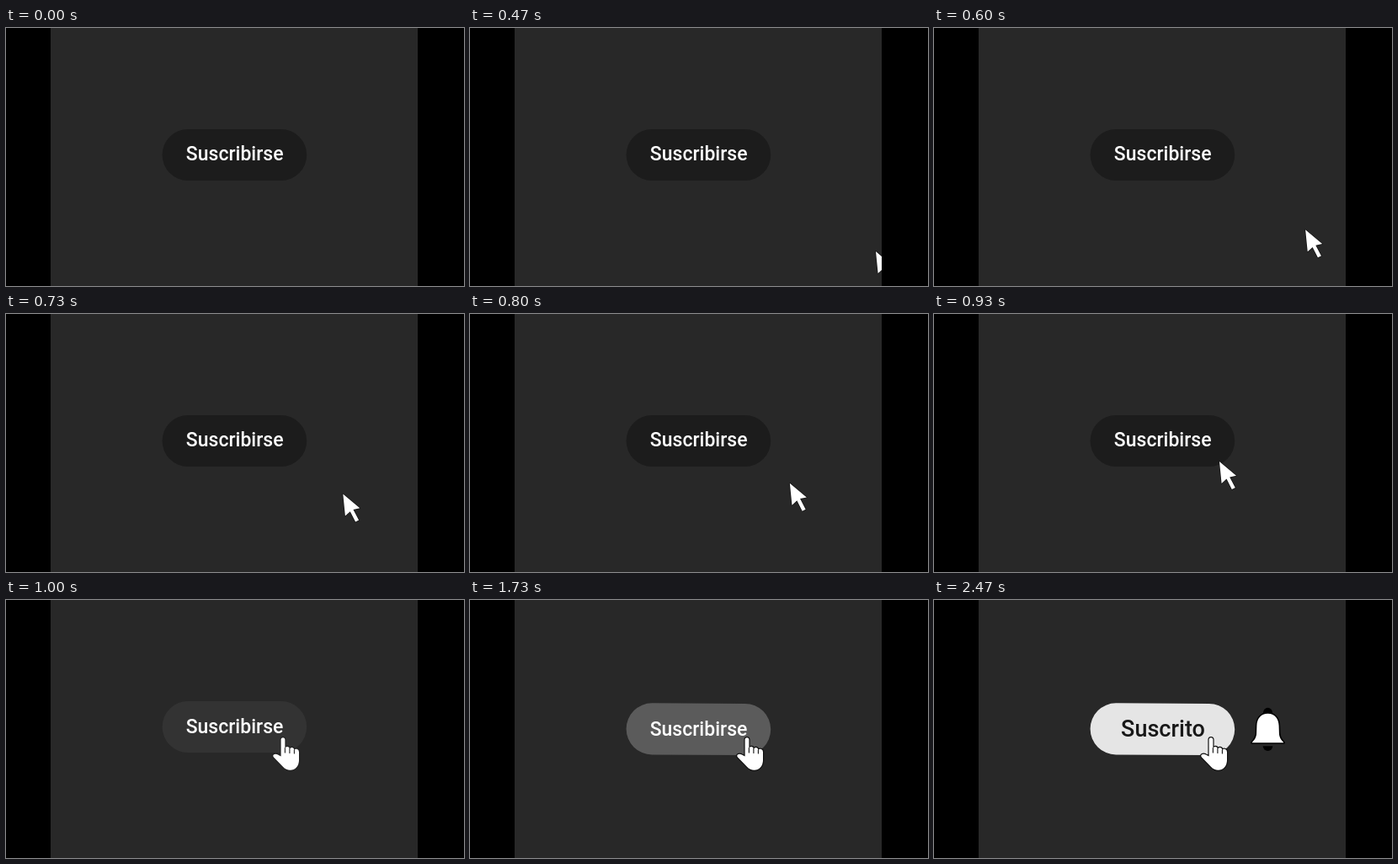
Animation, 544 px wide and 306 px high, one loop 4990 ms. Source, as an HTML page with a canvas:

```html
<!DOCTYPE html>
<html lang="es">
<head>
<meta charset="utf-8">
<title>Suscribirse</title>
<style>
  html, body { margin: 0; width: 100%; height: 100%; overflow: hidden; background: #000; }
  canvas { display: block; width: 544px; height: 306px; }
</style>
</head>
<body>
<canvas id="stage" width="544" height="306"></canvas>
<script>
const ctx = document.getElementById('stage').getContext('2d');
const LOOP = 4990;
const FRAME = 1000 / 15;
const ENTER = 470, HOVER = 1000, PRESS = 1730, DONE = 2470;

const arrow = new Path2D('M0 0 L20 16.8 L12.2 18.4 L18.8 31 L14.8 33 L8.5 20.6 L2.6 26 Z');

const hand = new Path2D(
  'M326.6 185.5 V165.8 Q326.6 163.2 329 163.2 Q331.4 163.2 331.4 165.8 V175.8 ' +
  'Q332.3 173.8 334.4 174 Q336.6 174.2 336.9 176.6 Q338 174.7 340 175 ' +
  'Q342.2 175.4 342.4 178 Q343.5 176.3 345.5 176.8 Q348 177.4 348 180.2 ' +
  'V190 Q348 195 345 198.5 Q342 201.8 337.5 201.8 Q332.8 201.8 329.2 198 ' +
  'L318 186.6 Q316.4 184.6 318.2 183.3 Q320 182.2 322.4 183.2 Z');
const knuckles = new Path2D('M331.4 175.5 V181 M336.9 176.4 V181.5 M342.4 177.8 V182');

const bell = new Path2D(
  'M396.5 134.8 C388.5 134.8 383.6 140.6 383.4 149 L383.1 158 ' +
  'C382.9 163.5 380.5 166 377.6 169.2 L415.4 169.2 ' +
  'C412.5 166 410.1 163.5 409.9 158 L409.6 149 C409.4 140.6 404.5 134.8 396.5 134.8 Z');

function shape(path, fill, stroke, width) {
  ctx.lineJoin = 'round';
  ctx.lineWidth = width;
  ctx.strokeStyle = stroke;
  ctx.stroke(path);
  ctx.fillStyle = fill;
  ctx.fill(path);
}

function pill(color, top, bottom, tilt) {
  const left = 185.6, right = 357.2, r = (bottom - top) / 2;
  const mid = top + r;
  ctx.beginPath();
  ctx.arc(left + r, mid, r, Math.PI / 2, Math.PI * 1.5);
  ctx.lineTo(right - r, top + tilt);
  ctx.arc(right - r, mid + tilt, r, -Math.PI / 2, Math.PI / 2);
  ctx.closePath();
  ctx.fillStyle = color;
  ctx.fill();
}

function label(text, size, x, y, color) {
  ctx.font = `500 ${size}px Roboto, sans-serif`;
  ctx.textAlign = 'center';
  ctx.textBaseline = 'alphabetic';
  ctx.fillStyle = color;
  ctx.fillText(text, x, y);
}

function drawArrow(t) {
  const step = Math.min(7, Math.floor((t - ENTER + 8) / FRAME));
  const p = step / 7;
  ctx.save();
  ctx.translate(482 - 143 * p, 265 - 90 * p);
  shape(arrow, '#fff', '#161616', 1.6);
  ctx.restore();
}

function drawHand(outline) {
  shape(hand, '#fff', outline, 2.4);
  ctx.lineWidth = 1.1;
  ctx.lineCap = 'round';
  ctx.strokeStyle = outline;
  ctx.stroke(knuckles);
}

function drawBell() {
  ctx.fillStyle = '#000';
  ctx.beginPath();
  ctx.arc(396.5, 133.2, 5.4, 0, Math.PI * 2);
  ctx.fill();
  ctx.beginPath();
  ctx.arc(396.5, 173.2, 5.8, 0, Math.PI);
  ctx.fill();
  shape(bell, '#fff', '#000', 3);
}

function draw(t) {
  ctx.fillStyle = '#000';
  ctx.fillRect(0, 0, 544, 306);
  ctx.save();
  ctx.beginPath();
  ctx.rect(53, 0, 436, 306);
  ctx.clip();
  ctx.fillStyle = '#282828';
  ctx.fillRect(53, 0, 436, 306);

  if (t < HOVER) {
    pill('#1c1c1c', 120, 181, 0);
    label('Suscribirse', 23, 271.7, 157, '#fff');
    if (t >= ENTER) drawArrow(t);
  } else if (t < PRESS) {
    pill('#333', 120, 181, 0);
    label('Suscribirse', 23, 271.5, 158.2, '#fff');
    drawHand('#222');
  } else if (t < DONE) {
    pill('#5b5b5b', 122.3, 183.4, 0.6);
    label('Suscribirse', 23, 271.5, 160.7, '#fff');
    drawHand('#111');
  } else {
    pill('#e5e5e5', 122.3, 183.4, 0.6);
    label('Suscrito', 27, 272, 162, '#181818');
    drawHand('#111');
    drawBell();
  }
  ctx.restore();
}

const start = performance.now();
function tick() {
  draw((performance.now() - start) % LOOP);
  requestAnimationFrame(tick);
}
tick();
</script>
</body>
</html>
```
